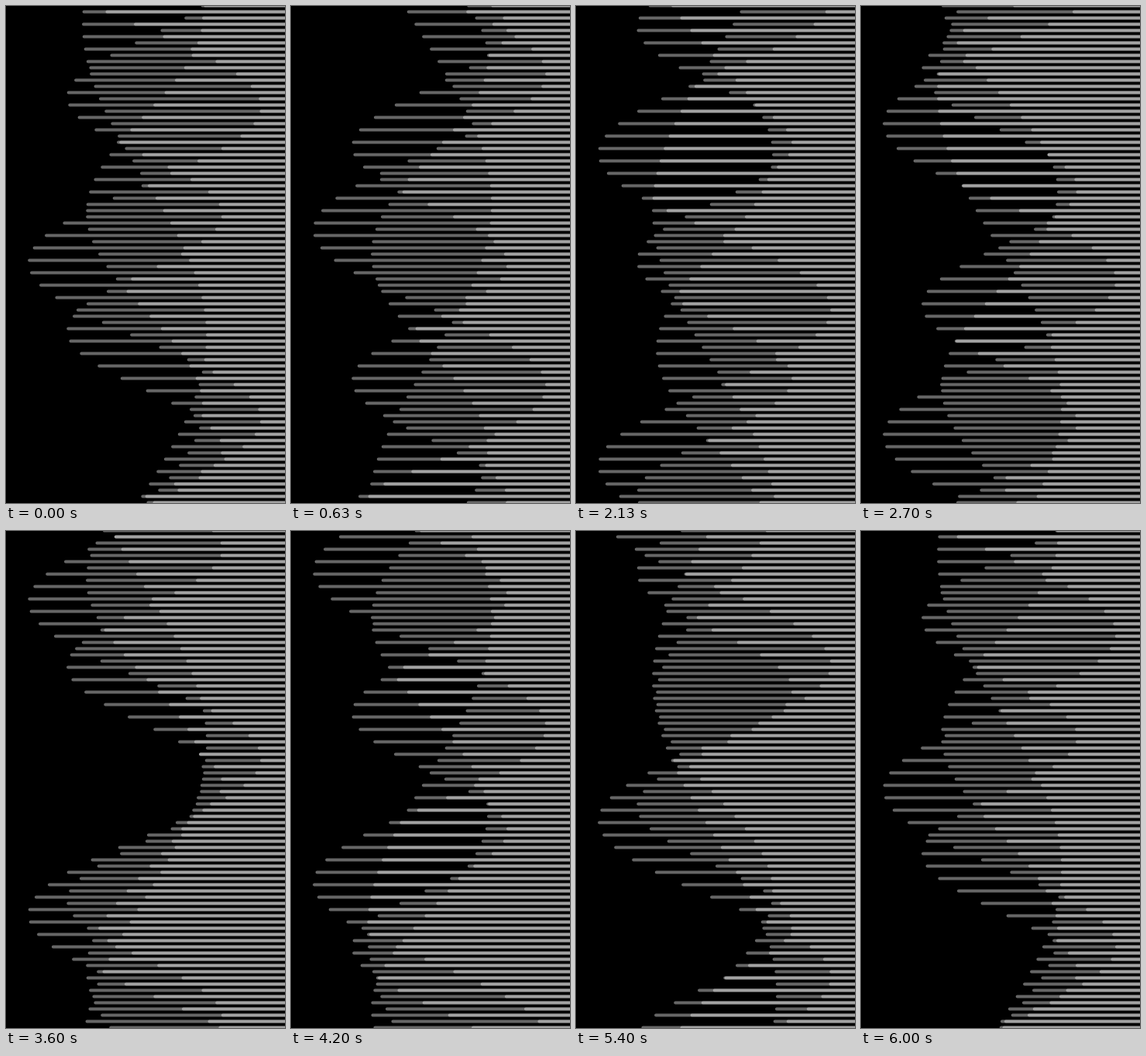
An HTML page that plays this animation: 360x640 px, repeating every 6.06 s.

```html
<!DOCTYPE html>
<html lang="en">
<head>
<meta charset="utf-8">
<title>Line waves</title>
<style>
  html, body { margin: 0; width: 100%; height: 100%; overflow: hidden; background: #000; }
  svg { display: block; width: 360px; height: 640px; }
  path { fill: none; stroke: #fff; stroke-opacity: .4; stroke-width: 4; stroke-linecap: round; }
</style>
</head>
<body>
<svg id="stage" viewBox="0 0 360 640"></svg>
<script>
const LOOP = 6060, STEPS = 180, SPACING = 8, ROWS = 80;
const CENTER = 180, RIGHT = 370;
const HOLD = 29; // the step at which the motion pauses once

// Two waves share the odd rows and rise, two share the even rows and sink.
// reach: signed amplitude, peak: row of the crest, width: rows per radian
const waves = [
  { first: 1, reach: -150, peak: 41.67, width: 8, turns: 1 },
  { first: 1, reach: 80, peak: 54.25, width: 16, turns: 2 },
  { first: 0, reach: -100, peak: 14.3, width: 6, turns: -2 },
  { first: 0, reach: 75, peak: 64.4, width: 10, turns: -1 }
];

const stage = document.getElementById('stage');
for (const wave of waves) {
  wave.path = document.createElementNS('http://www.w3.org/2000/svg', 'path');
  stage.append(wave.path);
}

function outline({ first, reach, peak, width, turns }, angle) {
  let d = '';
  for (let row = first; row <= ROWS; row += 2) {
    const x = CENTER + reach * Math.cos((row - peak) / width + turns * angle);
    d += `M${x.toFixed(2)} ${row * SPACING - 0.5}H${RIGHT}`;
  }
  return d;
}

function render(ms) {
  const step = Math.min(STEPS, Math.floor((ms % LOOP + 5) * 0.03));
  const phase = step < HOLD ? step + 1 : step;
  const angle = 2 * Math.PI * phase / STEPS;
  for (const wave of waves) wave.path.setAttribute('d', outline(wave, angle));
}

const start = performance.now();
function tick() {
  render(performance.now() - start);
  requestAnimationFrame(tick);
}
tick();
</script>
</body>
</html>
```
